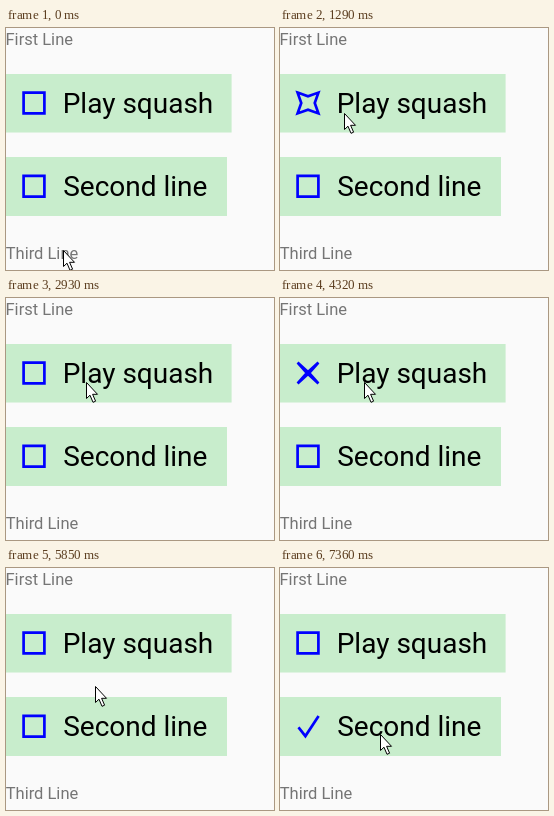
Recreate the animation shown at these times as an HTML page. Size 268 by 242 pixels, loop 8 s.

```html
<!DOCTYPE html>
<html lang="en">
<head>
<meta charset="utf-8">
<title>Morphing checkboxes</title>
<style>
  html, body { margin: 0; width: 100%; height: 100%; overflow: hidden; background: #fafafa; }
  svg { display: block; width: 268px; height: 242px; }
  text { font-family: Roboto, sans-serif; }
  .small { font-size: 16.5px; fill: #757575; }
  .large { font-size: 28px; fill: #000; }
  .row { fill: #c8edcc; }
  .mark { fill: none; stroke: #00f; stroke-width: 2.7; stroke-miterlimit: 4; }
</style>
</head>
<body>
<svg viewBox="0 0 268 242">
  <text class="small" x="-0.5" y="17">First Line</text>
  <rect class="row" y="46" width="225.6" height="58.5"/>
  <rect class="row" y="129" width="221" height="59"/>
  <text class="large" x="56.7" y="85">Play squash</text>
  <text class="large" x="57.2" y="168">Second line</text>
  <text class="small" x="-0.3" y="231">Third Line</text>
  <path class="mark" id="cross"/>
  <path class="mark" id="tick"/>
  <path id="pointer" fill="#fff" stroke="#000" stroke-linejoin="round"
    d="M.5 .5V16.5L4 13.2 7 20.3 9.6 19.2 6.6 12.3H11.5Z"/>
</svg>
<script>
// The picture changes in beats; all times below are counted in beats.
const LOOP = 8000, FIRST = 400, BEAT = 139;
const MORPH = 2.5, HALF = 10.4;
const [cross, tick, pointer] = ['cross', 'tick', 'pointer'].map(id => document.getElementById(id));

const home = [57, 222];
const moves = [
  { at: -1, beats: 2, to: [77, 134] },
  { at: 1, beats: 1, to: [64, 85] },
  { at: 10, beats: 3, to: [80, 84] },
  { at: 23, beats: 1, to: [84, 84] },
  { at: 38, beats: 1, to: [89, 118] },
  { at: 39, beats: 3, to: [100, 166] }
];

const clamp = v => Math.min(1, Math.max(0, v));
const mix = (a, b, p) => a.map((v, i) => v + (b[i] - v) * p);
const toPath = (points, cx, cy) =>
  'M' + points.map(([x, y]) => `${cx + x} ${cy + y}`).join('L') + 'Z';

// Eased 0 to 1 from the given beat on.
function morph(beat, from) {
  const p = clamp((beat - from) / MORPH);
  return p * p * (3 - 2 * p);
}

// The sides of a square fold in to its centre and leave a cross.
function crossPath(p) {
  const side = HALF * (1 - p);
  return toPath([
    [-HALF, -HALF], [0, -side], [HALF, -HALF], [side, 0],
    [HALF, HALF], [0, side], [-HALF, HALF], [-side, 0]
  ], 28, 75);
}

// A turned square flattens its top corner onto the bottom one, leaving a tick.
function tickPath(deg, p) {
  const left = [-9.5, 1], bottom = [-2.6, 9.8], right = [10.6, -10.4];
  const corners = [left, bottom, right, bottom].map((end, i) => {
    const a = (135 + 90 * i + deg) * Math.PI / 180;
    const r = HALF * Math.SQRT2;
    return mix([Math.cos(a) * r, Math.sin(a) * r], end, p);
  });
  return toPath(corners, 28, 158.3);
}

function draw(now) {
  const beat = Math.floor((now % LOOP - FIRST) / BEAT);
  const spot = moves.reduce((from, m) => mix(from, m.to, clamp((beat - m.at) / m.beats)), home);
  const pinch = morph(beat, 5) - morph(beat, 14.8) + morph(beat, 26) - morph(beat, 34.8);
  const turn = 45 * clamp((beat - 42) / 4.5);
  pointer.setAttribute('transform', `translate(${spot.map(Math.round)})`);
  cross.setAttribute('d', crossPath(pinch));
  tick.setAttribute('d', tickPath(turn, morph(beat, 47)));
}

const start = performance.now();
function loop() {
  draw(performance.now() - start);
  requestAnimationFrame(loop);
}
loop();
</script>
</body>
</html>
```
